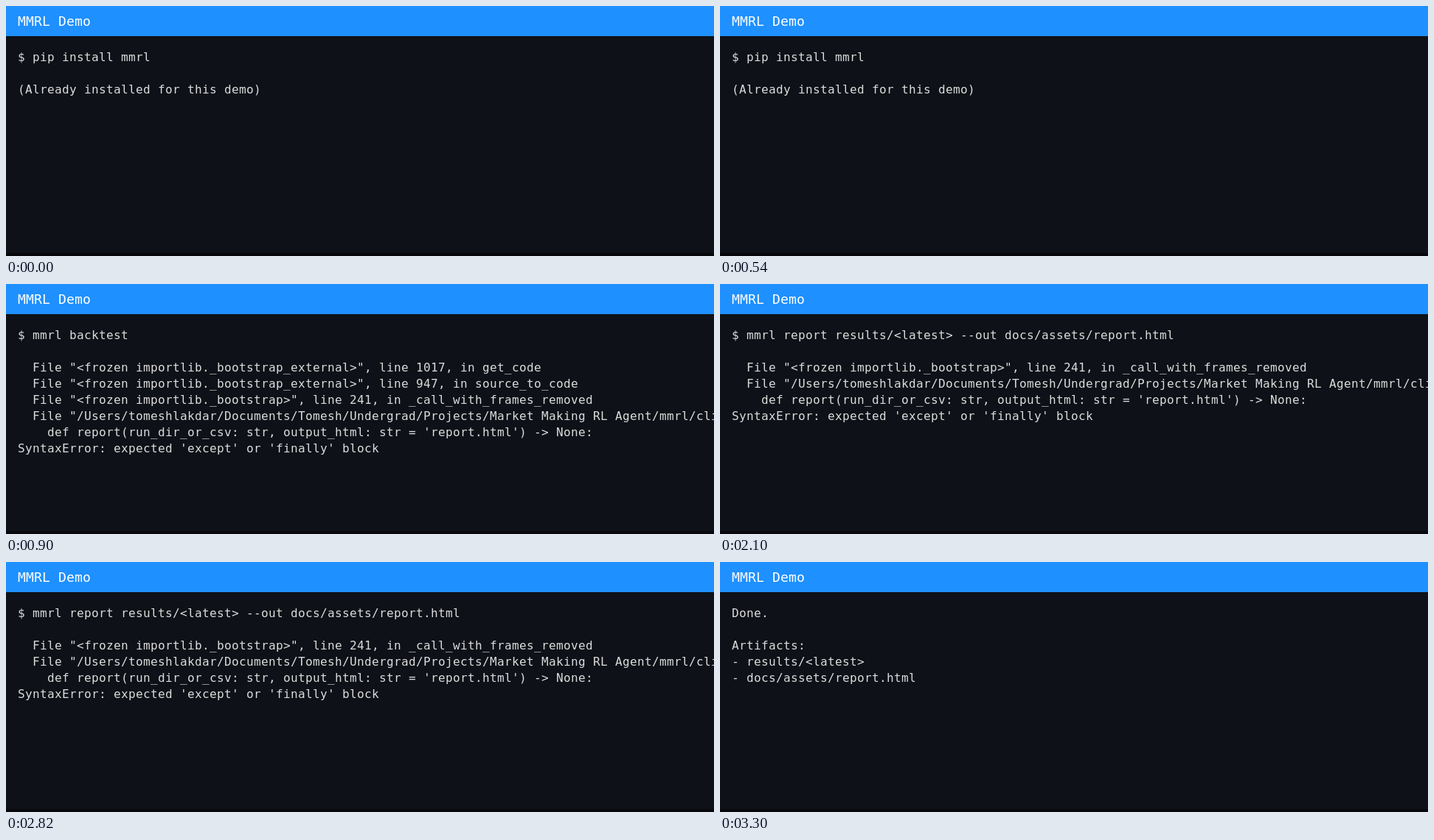
An HTML page that plays this animation: 960 px wide and 340 px high, repeating every 4100 ms.

```html
<!DOCTYPE html>
<html lang="en">
<head>
<meta charset="utf-8">
<title>MMRL Demo</title>
<style>
  html, body { margin: 0; width: 100%; height: 100%; overflow: hidden; background: #0e1117; }
  svg { display: block; width: 960px; height: 340px; }
  text {
    font: 16px "DejaVu Sans Mono", monospace;
    letter-spacing: calc(10px - 1ch); /* whole-pixel character grid */
    fill: #dcdcdc;
  }
  .title { font-size: 18px; letter-spacing: calc(11px - 1ch); fill: #fff; }

  .screen { visibility: hidden; animation: 4100ms step-end infinite; }
  .install { animation-name: install; }
  .backtest { animation-name: backtest; }
  .report { animation-name: report; }
  .done { animation-name: done; }

  /* cuts at 900, 2100 and 3300 ms */
  @keyframes install {
    0% { visibility: visible; }
    21.9512%, 100% { visibility: hidden; }
  }
  @keyframes backtest {
    0% { visibility: hidden; }
    21.9512% { visibility: visible; }
    51.2195%, 100% { visibility: hidden; }
  }
  @keyframes report {
    0% { visibility: hidden; }
    51.2195% { visibility: visible; }
    80.4878%, 100% { visibility: hidden; }
  }
  @keyframes done {
    0% { visibility: hidden; }
    80.4878%, 100% { visibility: visible; }
  }
</style>
</head>
<body>
<svg viewBox="0 0 960 340">
  <rect width="960" height="340" fill="#0e1117"/>
  <rect width="960" height="41" fill="#1e90ff"/>
  <rect y="336" width="960" height="4" fill="#08080c"/>
  <text class="title" x="16" y="27">MMRL Demo</text>

  <g class="screen install">
    <text x="16" y="75">$ pip install mmrl</text>
    <text x="16" y="119">(Already installed for this demo)</text>
  </g>

  <g class="screen backtest">
    <text x="16" y="75">$ mmrl backtest</text>
    <text x="36" y="119">File "&lt;frozen importlib._bootstrap_external&gt;", line 1017, in get_code</text>
    <text x="36" y="141">File "&lt;frozen importlib._bootstrap_external&gt;", line 947, in source_to_code</text>
    <text x="36" y="163">File "&lt;frozen importlib._bootstrap&gt;", line 241, in _call_with_frames_removed</text>
    <text x="36" y="185">File "/Users/tomeshlakdar/Documents/Tomesh/Undergrad/Projects/Market Making RL Agent/mmrl/cli.py"</text>
    <text x="56" y="207">def report(run_dir_or_csv: str, output_html: str = 'report.html') -&gt; None:</text>
    <text x="16" y="229">SyntaxError: expected 'except' or 'finally' block</text>
  </g>

  <g class="screen report">
    <text x="16" y="75">$ mmrl report results/&lt;latest&gt; --out docs/assets/report.html</text>
    <text x="36" y="119">File "&lt;frozen importlib._bootstrap&gt;", line 241, in _call_with_frames_removed</text>
    <text x="36" y="141">File "/Users/tomeshlakdar/Documents/Tomesh/Undergrad/Projects/Market Making RL Agent/mmrl/cli.py"</text>
    <text x="56" y="163">def report(run_dir_or_csv: str, output_html: str = 'report.html') -&gt; None:</text>
    <text x="16" y="185">SyntaxError: expected 'except' or 'finally' block</text>
  </g>

  <g class="screen done">
    <text x="16" y="75">Done.</text>
    <text x="16" y="119">Artifacts:</text>
    <text x="16" y="141">- results/&lt;latest&gt;</text>
    <text x="16" y="163">- docs/assets/report.html</text>
  </g>
</svg>
</body>
</html>
```
